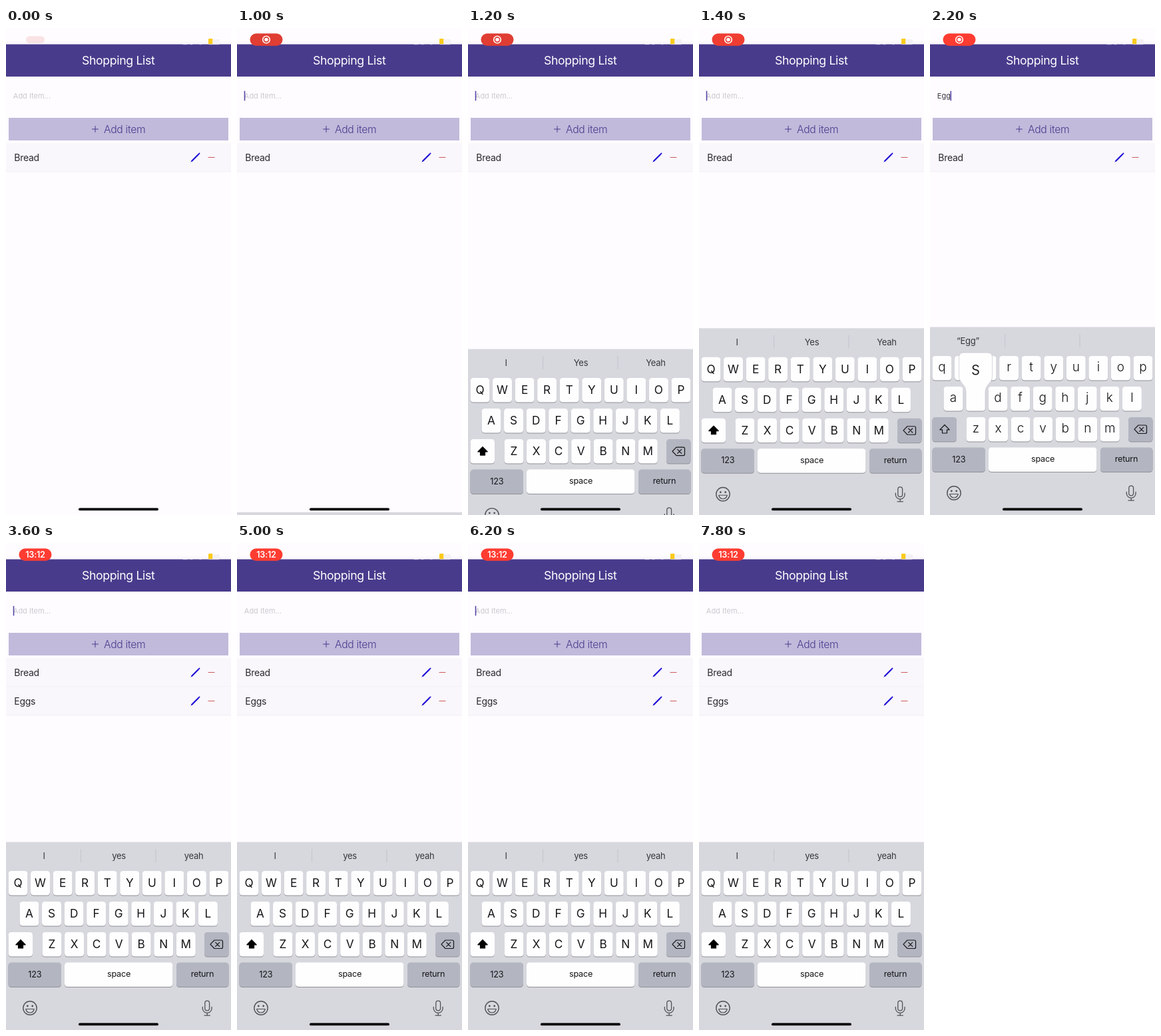
These frames come from a looping animation (338 by 732 pixels, 8000 ms). An HTML page:

```html
<!DOCTYPE html>
<html lang="en">
<head>
<meta charset="utf-8">
<title>Shopping List</title>
<style>
  html, body { margin: 0; width: 100%; height: 100%; overflow: hidden; background: #fefcff; }
  svg { display: block; width: 100%; height: 100%; font-family: Inter, Roboto, sans-serif; }
</style>
</head>
<body>
<svg id="stage" viewBox="0 0 338 732"></svg>
<script>
const LOOP = 8000, STEP = 200;
const PURPLE = '#493b8c', INK = '#161618', GREY_KEY = '#b3b6c1', ICON = '#505258';
const TAP_FIELD = 989, TAP_ADD = 3150, CLOCK_AT = 2900;

// character, finger down, finger up
const STROKES = [['E', 1560, 1680], ['g', 1770, 1870], ['g', 1970, 2070], ['s', 2150, 2330]];
const ROWS = [['QWERTYUIOP', 18, 493], ['ASDFGHJKL', 35, 539], ['ZXCVBNM', 69, 585]];
const PITCH = 33.55;

const stage = document.getElementById('stage');
const clamp = v => Math.max(0, Math.min(1, v));
const mix = (a, b, k) => a + (b - a) * k;

const rect = (x, y, w, h, fill, r = 0) =>
  `<rect x="${x}" y="${y}" width="${w}" height="${h}" rx="${r}" fill="${fill}"/>`;
const line = (d, color, width = 1.2, fill = 'none') =>
  `<path d="${d}" fill="${fill}" stroke="${color}" stroke-width="${width}" stroke-linecap="round" stroke-linejoin="round"/>`;
const label = (s, x, y, size, fill, { anchor = 'start', weight = 400, gap = -0.02 } = {}) =>
  `<text x="${x}" y="${y}" font-size="${size}" fill="${fill}" text-anchor="${anchor}" ` +
  `font-weight="${weight}" letter-spacing="${(gap * size).toFixed(2)}">${s}</text>`;
const centred = (s, x, y, size, fill, weight = 400, gap = -0.02) =>
  label(s, x, y, size, fill, { anchor: 'middle', weight, gap });

const key = (x, y, w, fill = '#fefeff') =>
  rect(x, y + 1, w, 36.5, '#8f9197', 4.5) + rect(x, y, w, 36.5, fill, 4.5);

function statusBar(t) {
  const grow = clamp(t / 350);
  const scale = mix(0.57, 1, grow);
  const dim = clamp((1600 - t) / 400);
  const red = `rgb(${mix(255, 224, dim)},${mix(60, 61, dim)},${mix(49, 51, dim)})`;
  const face = t < CLOCK_AT
    ? `<circle r="5.3" fill="none" stroke="#fff" stroke-width="1.6"/><circle r="2.8" fill="#fff"/>`
    : centred('13:12', 0, 4.6, 12.7, '#fff', 600);
  return rect(0, 20, 338, 5, '#faf8fc') +
    rect(304, 16, 6.5, 8.5, '#fbcb1c', 1) + rect(310.5, 17, 10.5, 7.5, '#f3f1f4', 1) +
    rect(0, 24.5, 338, 48.5, PURPLE) +
    line('M266 24.6h6M277 24.6h3M291 24.6h2M305 24.6h15', '#d8d3e8', 0.9) +
    `<g transform="translate(44 17.5) scale(${scale})" opacity="${mix(0.13, 1, grow)}">` +
    rect(-24.5, -9.2, 49, 18.4, red, 9.2) + (grow > 0 ? face : '') + '</g>';
}

function itemRow(name, y) {
  return rect(0, y, 338, 43, '#f9f7fb') + rect(0, y + 42.5, 338, 0.8, '#eeecf0') +
    label(name, 12.3, y + 27, 14, '#29282c') +
    `<g transform="translate(284.5 ${y + 21.5})">` +
    line('M-5.2 5.2L4.3-4.3', '#2413d6', 2.3) + line('M-6.6 6.6L-5 5', '#2413d6', 1) +
    line('M5.4-5.4L6-6', '#2413d6', 2) + '</g>' +
    line(`M304 ${y + 21.5}h9`, '#cf5a5c', 1.2);
}

function page(t, typed) {
  const pressed = t >= 3000 && t < TAP_ADD;
  const blinkFrom = t < TAP_ADD ? (t < 2400 ? t : 2350) : TAP_ADD;
  const caretOn = t >= TAP_FIELD && (t - blinkFrom) % 1000 < 550;
  const caretX = 11.5 + (typed ? [0, 6.8, 13.3, 19.8, 25.6][typed.length] : 0);
  return centred('Shopping List', 168.7, 54.7, 17.7, '#fff') +
    label(typed || 'Add Item...', 10.8, 106, 11, typed ? '#38363b' : '#cbc8ce', { gap: 0 }) +
    (caretOn ? rect(caretX - 0.8, 94.5, 1.6, 15, '#5648a8', 0.8) : '') +
    `<g opacity="${pressed ? 0.4 : 1}">` + rect(4, 135, 330, 34, '#c1badb') +
    line('M129.5 152h9M134 147.5v9', PURPLE, 1) +
    label('Add item', 147, 157.7, 15.7, PURPLE, { weight: 300 }) + '</g>' +
    itemRow('Bread', 173) + (t >= TAP_ADD ? itemRow('Eggs', 216) : '');
}

function letterKeys(upper) {
  return ROWS.map(([chars, x0, y]) => [...chars].map((c, i) => {
    const x = x0 + i * PITCH;
    return key(x - 14.5, y, 29) + (upper
      ? centred(c, x, y + 24.4, 17.2, INK, 400, 0)
      : centred(c.toLowerCase(), x, y + 23.3, 19, INK, 300, 0));
  }).join('')).join('');
}

function popup(c) {
  const [chars, x0, y] = ROWS.find(r => r[0].includes(c.toUpperCase()));
  const x = x0 + chars.indexOf(c.toUpperCase()) * PITCH;
  return `<g transform="translate(${x} ${y})">` +
    `<path d="M-18-51H18Q25-51 25-44V-16C25-5 14.5-3 14.5 8V32Q14.5 36.5 10 36.5H-10Q-14.5 36.5-14.5 32` +
    `V8C-14.5-3-25-5-25-16V-44Q-25-51-18-51Z" fill="#fefeff" stroke="#c6c8ce" stroke-width=".7"/>` +
    centred(c, 0, -18.5, 26, INK, 300, 0) + '</g>';
}

function hints(t, typed) {
  const words = typed ? [`“${typed}”`, '', ''] : t < TAP_ADD ? ['I', 'Yes', 'Yeah'] : ['I', 'yes', 'yeah'];
  return words.map((w, i) => centred(w, 57 + i * 112.5, 475.2, 13, '#36373b')).join('') +
    rect(112, 460, 0.8, 20, '#bfc1c8') + rect(224.6, 460, 0.8, 20, '#bfc1c8');
}

function keyboard(t, typed, stroke) {
  if (t < TAP_FIELD) return '';
  // critically damped rise
  const k = 0.0175 * (t - TAP_FIELD);
  const drop = 283 * (1 + k) * Math.exp(-k);
  const upper = !typed;
  const arrow = 'M22 596.5L29.2 603.8H25.5V609H18.5V603.8H14.8Z';
  return `<g transform="translate(0 ${drop.toFixed(2)})">` +
    rect(0, 449.5, 338, 300, '#d7d8de') + hints(t, typed) + letterKeys(upper) +
    key(3.5, 585, 36.5, upper ? '#fefeff' : GREY_KEY) +
    line(arrow, upper ? '#000' : INK, 1.2, upper ? '#000' : 'none') +
    key(298, 585, 36.5, GREY_KEY) +
    line('M313 597H323.5Q325.5 597 325.5 599V607.5Q325.5 609.5 323.5 609.5H313L307 603.2Z', INK, 1.2) +
    line('M314.7 600.3l6 6M320.7 600.3l-6 6', INK, 1.2) +
    key(3.5, 630.5, 79.5, GREY_KEY) + key(88, 630.5, 162.5) + key(256, 630.5, 78.5, GREY_KEY) +
    centred('123', 43.3, 652.7, 12.7, INK) + centred('space', 169.5, 652, 12.7, INK) +
    centred('return', 295, 652, 12.7, INK) +
    `<circle cx="36" cy="699" r="10.2" fill="none" stroke="${ICON}" stroke-width="1.4"/>` +
    `<circle cx="32.3" cy="696" r="1.4" fill="${ICON}"/><circle cx="39.7" cy="696" r="1.4" fill="${ICON}"/>` +
    line('M29.7 700.5H42.3Q41 706 36 706T29.7 700.5Z', ICON, 1.2) +
    line('M298.8 691.5a3.4 3.4 0 0 1 6.8 0v8a3.4 3.4 0 0 1-6.8 0Z', ICON, 1.3) +
    line('M295.3 697.5v2a6.9 6.9 0 0 0 13.8 0v-2M302.2 706.5v3.6M298 710.1h8.4', ICON, 1.3) +
    (stroke ? popup(stroke[0]) : '') + '</g>';
}

function draw(t) {
  const typed = t < TAP_ADD ? STROKES.filter(s => t >= s[2]).map(s => s[0]).join('') : '';
  const stroke = STROKES.find(s => t >= s[1] && t < s[2]);
  stage.innerHTML = rect(0, 0, 338, 732, '#fefcff') + statusBar(t) + page(t, typed) +
    keyboard(t, typed, stroke) + rect(109, 721.5, 120, 3.8, '#000', 1.9);
}

let shown = -1;
function tick() {
  const t = Math.floor(performance.now() % LOOP / STEP) * STEP;
  if (t !== shown) draw(shown = t);
  requestAnimationFrame(tick);
}
tick();
</script>
</body>
</html>
```
